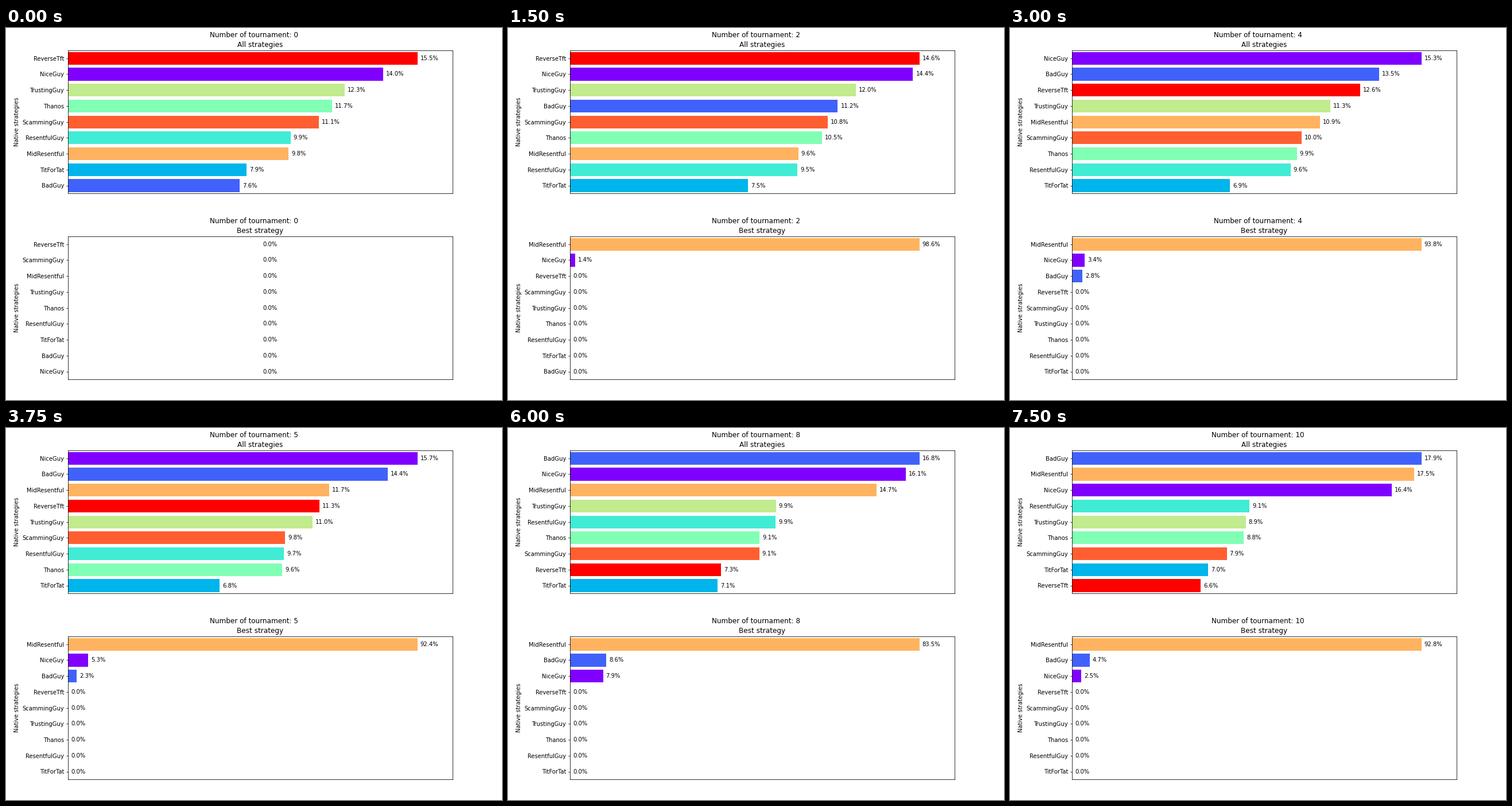
Write a matplotlib script that moves like this. It is 864 by 648 pixels and loops after 8 s.

```python
import matplotlib.pyplot as plt
import numpy as np
from matplotlib.animation import FuncAnimation
from numpy.polynomial import polynomial as poly

W, H, DPI = 864, 648, 72
STEP, TICK, LOOP = 750, 250, 8000
LAST = 10

# Share of each strategy at the key tournaments; a smooth curve joins them
KEYS = (0, 2, 5, 8, 10)
SHARES = {
    "NiceGuy": (13.99, 14.36, 15.70, 16.14, 16.37),
    "BadGuy": (7.63, 11.21, 14.37, 16.80, 17.90),
    "TitForTat": (7.94, 7.46, 6.81, 7.10, 6.97),
    "ResentfulGuy": (9.88, 9.52, 9.70, 9.88, 9.09),
    "Thanos": (11.72, 10.54, 9.62, 9.11, 8.79),
    "TrustingGuy": (12.28, 11.96, 10.98, 9.90, 8.90),
    "MidResentful": (9.80, 9.56, 11.74, 14.73, 17.53),
    "ScammingGuy": (11.14, 10.79, 9.75, 9.10, 7.93),
    "ReverseTft": (15.52, 14.63, 11.29, 7.27, 6.59),
}
NAMES = list(SHARES)
CURVES = poly.polyfit(KEYS, np.transpose(list(SHARES.values())), len(KEYS) - 1)
COLORS = dict(zip(NAMES, plt.cm.rainbow(np.linspace(0, 1, len(NAMES)))))

# Order that ties fall back to in the lower chart
TIE_ORDER = ["ReverseTft", "ScammingGuy", "MidResentful", "TrustingGuy", "Thanos",
             "ResentfulGuy", "TitForTat", "BadGuy", "NiceGuy"]


def ranked(names, values):
    return sorted(zip(names, values), key=lambda pair: -pair[1])


def all_rows(n):
    return ranked(NAMES, poly.polyval(n, CURVES))


def best_rows(n):
    wins = {}
    if n:
        nice = np.interp(n, (1, 3, 5, 7, 8, 10), (1.3, 1.5, 5.3, 1.1, 7.9, 2.5))
        bad = np.interp(n, (2, 3, 5, 7, 10), (0, 3.3, 2.3, 10.6, 4.7))
        wins = {"NiceGuy": nice, "BadGuy": bad, "MidResentful": 100 - nice - bad}
    return ranked(TIE_ORDER, [wins.get(name, 0) for name in TIE_ORDER])


def draw_chart(panel, ax, rows, n, heading):
    ax.clear()
    names, values = zip(*rows)
    ys = range(len(names))
    bars = ax.barh(ys, values, height=0.8, color=[COLORS[name] for name in names])
    ax.bar_label(bars, fmt="%.1f%%", padding=5)
    top = max(values) * 1.1
    ax.set_xlim((0, top) if top else (-1, 1))
    ax.set_ylim(len(names) - 0.5, -0.5)
    ax.set_xticks([])
    ax.set_yticks(ys, names)
    ax.set_ylabel("Native strategies")
    ax.set_title(heading)
    panel.suptitle(f"Number of tournament: {n}")


def update(frame):
    n = min(frame * TICK // STEP, LAST)
    draw_chart(upper, ax_all, all_rows(n), n, "All strategies")
    draw_chart(lower, ax_best, best_rows(n), n, "Best strategy")


fig = plt.figure(figsize=(W / DPI, H / DPI), dpi=DPI)
upper, lower = fig.subfigures(2, 1)
ax_all, ax_best = upper.subplots(), lower.subplots()

anim = FuncAnimation(fig, update, frames=LOOP // TICK, init_func=lambda: None,
                     interval=TICK, repeat=True, repeat_delay=0)
plt.show()
```
